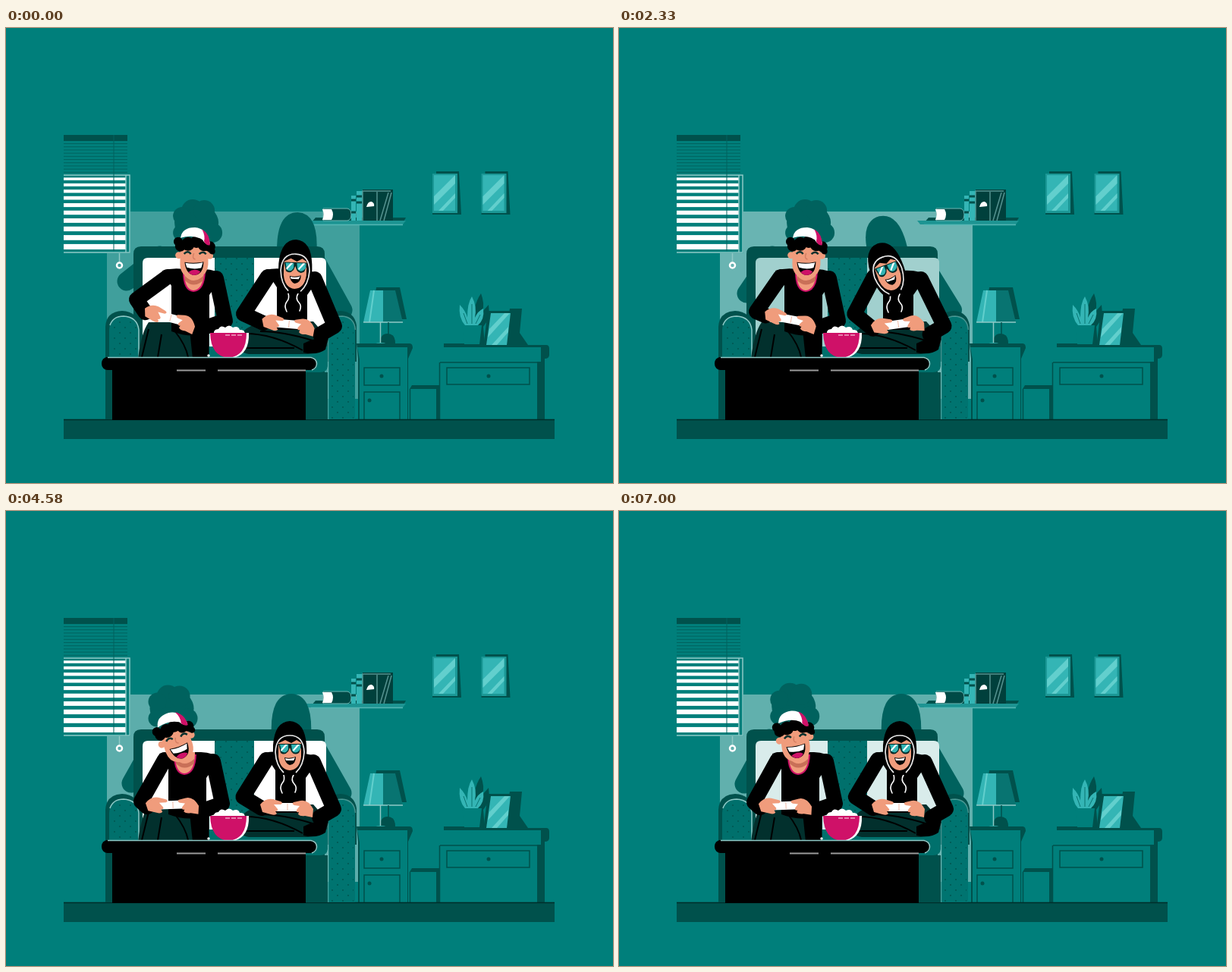
Animation of 800 by 600 pixels, one loop 7040 ms. Source, as an HTML page:

```html
<!DOCTYPE html>
<html lang="en">
<head>
<meta charset="utf-8">
<title>Game night</title>
<style>
html, body { margin: 0; width: 100%; height: 100%; overflow: hidden; background: #007f7b; }
svg { display: block; width: 800px; height: 600px; }
.wall { fill: #007f7b; }
.dark { fill: #00514c; }
.shade { fill: #00625e; }
.glass { fill: #34b5b5; }
.glint { fill: #62cfcd; }
.white { fill: #fff; }
.skin { fill: #f09c7c; }
.pink { fill: #cf1168; }
.pants { fill: #02302d; }
.dots { fill: url(#dots); }
.line { fill: none; stroke: #00514c; stroke-width: 1.5; }
.pale { fill: none; stroke: #8fc9c6; stroke-width: 1.5; }
.cord { fill: none; stroke: #fff; stroke-width: 1.6; stroke-linecap: round; }
.arm, .cast { fill: none; stroke: #000; stroke-width: 20; stroke-linecap: round; stroke-linejoin: round; }
.cast { stroke: #00625e; stroke-width: 25; }
.crease { fill: none; stroke: #000; stroke-width: 2; }
</style>
</head>
<body>
<svg viewBox="0 0 800 600">
<defs>
  <pattern id="dots" width="14" height="14" patternUnits="userSpaceOnUse">
    <circle cx="3" cy="3" r=".9" fill="#00514c"/><circle cx="10" cy="10" r=".9" fill="#00514c"/>
  </pattern>
  <g id="picture">
    <path class="dark" d="M567 189H597L600 246H562V242H567Z"/>
    <path fill="#1b9896" d="M562 192H595V244H562Z"/>
    <path class="glass" d="M564 194H592V241H564Z"/>
    <path class="glint" d="M564 222L592 194V205L564 233ZM570 241L592 218V224L576 241Z"/>
  </g>
  <g id="pad">
    <rect class="white" x="-22" y="-5" width="44" height="11" rx="4"/>
    <path class="skin" d="M-36 -3Q-29 -12 -19 -10L-9 -7Q-5 -5 -9 -3L-18 -3L-13 3Q-12 6 -16 6L-14 9Q-16 12 -22 10L-33 7Z"/>
    <path class="skin" d="M34 3Q27 -10 17 -8L8 -6Q5 -4 9 -2L16 -1L12 4Q11 8 15 7L14 10Q17 13 23 12L33 14Z"/>
    <path d="M0 -4V5" stroke="#f1b9a5"/>
  </g>
</defs>

<!-- light and window -->
<path id="glow" class="white" d="M133 242H466V489H133Z"/>
<path class="dark" d="M76 141H160V149H76Z"/>
<path class="wall" d="M76 193H164V297H76Z"/>
<g id="blinds"></g>
<path class="pale" d="M76 194H163V296H76M158 194V296"/>
<path d="M142 141V294" stroke="#00625e"/>
<path class="pale" d="M149.500 297V309"/>
<circle cx="149.500" cy="313" r="3.500" fill="none" stroke="#fff" stroke-width="2.500"/>

<!-- shelf -->
<path class="dark" d="M408 250H527L523 257H402Z"/>
<path d="M393 254H527L523 259H397Z" fill="#1d9492"/>
<path d="M402 259.500H523" stroke="#56b7b4" stroke-width="1.500"/>
<path d="M418 238H450Q455 239 455 246Q455 253 450 254H418Z" fill="#004a46" stroke="#6fb6b3"/>
<path class="white" d="M417 239H429Q433 246 429 253H417Q420 246 417 239Z"/>
<path class="glass" d="M455 221H461V254H455ZM462 215H469V254H462Z"/>
<path d="M455 227H461M455 243H461M462 222H469M462 230H469" stroke="#00514c" stroke-width="3"/>
<path d="M470 213H510V254H470Z" fill="#00403c"/>
<path class="pale" d="M470 254V215H507M489 216V254M504 217L493 254M508 217L498 254" opacity=".6"/>
<path class="white" d="M475 236Q477 228 482 229Q486 231 485 235Z"/>

<!-- cast shadows -->
<g id="puff" class="shade">
  <ellipse cx="250" cy="257" rx="29" ry="25"/>
  <circle cx="245" cy="241" r="15"/><circle cx="260" cy="241" r="14"/>
  <circle cx="231" cy="248" r="12"/><circle cx="271" cy="270" r="13"/>
  <circle cx="230" cy="270" r="11"/><ellipse cx="251" cy="284" rx="20" ry="16"/>
</g>
<path id="dome" class="shade" d="M-26 56Q-29 1 0 0Q29 1 26 56Z"/>
<path id="cast1" class="cast"/>
<path id="cast2" class="cast"/>

<use href="#picture"/><use href="#picture" x="64.500"/>

<!-- lamp -->
<path class="dark" d="M488 342H519L528 384H482ZM493 416Q493 403 503 403Q513 403 513 416Z"/>
<path fill="#087471" d="M480 346H513L523 388H471Z"/>
<path class="glass" d="M480 346H497V388H471Z"/>
<path d="M485 346L479 388" stroke="#62cfcd" stroke-width="2"/>
<path class="pale" d="M471 388H523M493.500 388V416"/>
<path class="line" d="M504 388V404"/>
<path d="M482 420Q485 415 494 415Q503 415 505 420Z" fill="#2aa5a2"/>

<!-- small cabinet -->
<path class="dark" d="M462 416H532Q536 416 536 422L530 436V516H464V436Z"/>
<path class="wall" d="M463 421H529V516H466V437Z"/>
<path class="line" d="M472 448H519V471H472ZM472 517V480H519V517"/>
<circle class="dark" cx="495" cy="459" r="2.500"/><circle class="dark" cx="479" cy="491" r="2.500"/>
<path class="dark" d="M535 471H571V516H567V476H532Z"/>
<path class="line" d="M532.500 476V516"/>

<!-- large cabinet -->
<path class="dark" d="M577 418H712Q716 418 716 423V431Q716 436 710 436V516H700V436H577Z"/>
<path class="wall" d="M572 421H705V440H700V516H572Z"/>
<path class="line" d="M572 441H704M571.500 441V516M581 448H690V470H581Z"/>
<circle class="dark" cx="636" cy="459" r="2.500"/>
<path class="dark" d="M618 390Q614 368 626 350Q631 363 628 374L636 365Q639 382 629 394L631 418H577V416H619Z"/>
<path class="glass" d="M605 392Q596 382 598 365Q606 373 608 382Q608 363 614 354Q621 367 618 382Q622 373 629 370Q631 384 622 392Z"/>
<path d="M608 390L603 376M614 390V364M619 390L625 378" stroke="#087471" fill="none"/>
<path class="wall" d="M601 392H627L624 417H604Z"/>
<path class="dark" d="M664 370H680L677 402L688 418H657ZM635 373H668L663 421H629Z"/>
<path class="glass" d="M639 376H665L660 418H633Z"/>
<path class="glint" d="M637 397L657 376H664L635 408ZM640 418L662 394V401L647 418Z"/>

<!-- floor and sofa -->
<path class="dark" d="M76 516H723V542H76Z"/>
<path d="M76 516.500H723" stroke="#002e2b" stroke-width="1.500"/>
<path class="dark" d="M168 440V298Q168 288 178 288H410Q420 288 420 298V516H395V440Z"/>
<path class="white" d="M180 425V310Q180 303 187 303H275V425ZM327 425V303H415Q422 303 422 310V425Z"/>
<path id="dim" fill="#007f7b" d="M180 425V310Q180 303 187 303H275V425ZM327 425V303H415Q422 303 422 310V425Z"/>
<path fill="#00706c" d="M275 303H327V425H275Z"/><path class="dots" d="M275 303H327V425H275Z"/>
<path class="dark" d="M131 440V394Q132 374 153 373Q174 374 176 394V440Z"/>
<path fill="#00706c" d="M136 440V398Q137 381 155 380Q174 381 175 398V440Z"/>
<path class="dots" d="M138 440V398Q139 383 155 382Q173 383 174 398V440Z"/>
<path class="pale" d="M137 392Q141 380 155 380Q173 381 175 398V434"/>
<path class="dark" d="M422 440V394Q422 374 441 373Q459 374 462 392V440Z"/>
<path fill="#007470" d="M425 516V398Q427 380 443 380Q459 381 460 398V516Z"/>
<path class="dots" d="M428 516V398Q430 383 443 382Q457 383 458 398V516Z"/>
<path class="pale" d="M424.500 516V398Q426 380 443 380Q459 381 460.500 398" opacity=".5"/>
<path fill="#00706c" d="M176 420H424V446Q423 454 414 454H176Z"/>
<path class="dark" d="M395 454H424V516H395Z"/>

<!-- player in the cap -->
<path class="pants" d="M188 388H268V436H174Q178 402 188 388Z"/>
<path d="M242 398H267V436H246Z"/>
<path class="crease" d="M188 397L179 434M205 404L200 434M222 399Q237 418 240 434"/>
<path id="torso1" d="M206 320Q220 316 234 318H261Q278 318 285 328L268 352V402Q244 410 218 400V340Z"/>
<path id="armL1" class="arm"/><path id="armR1" class="arm"/>
<use id="pad1" href="#pad"/>
<g id="neck1">
  <path class="skin" d="M235 318H261V333Q257 347 247 347Q238 346 235 333Z"/>
  <path d="M234 321Q234 346 247 347Q261 346 262 321" fill="none" stroke="#cf1168" stroke-width="2"/>
  <path d="M236 327Q247 339 260 327V333Q247 344 236 333Z" fill="#c97058"/>
</g>
<g id="head1">
  <circle class="skin" cx="227" cy="300" r="4.500"/><circle class="skin" cx="268" cy="300" r="4.500"/>
  <path class="skin" d="M229 283H266V312Q265 329 247 330Q230 329 229 312Z"/>
  <circle cx="226" cy="282" r="6"/><circle cx="229" cy="288" r="7"/><circle cx="239" cy="285" r="9"/>
  <circle cx="250" cy="282" r="8"/><circle cx="260" cy="286" r="8"/><circle cx="268" cy="288" r="7"/>
  <circle cx="271" cy="294" r="4"/>
  <path class="white" d="M229 277Q231 263 248 263Q264 264 268 284Q262 286 258 279Q246 272 229 277Z"/>
  <path class="pink" d="M257 265Q268 271 268 286Q263 287 260 281Q262 274 257 265Z"/>
  <path d="M234 298Q239 293 243 298M254 298Q259 293 263 298" fill="none" stroke="#00302d" stroke-width="2.500"/>
  <path d="M247 297Q244 304 249 305" fill="none" stroke="#d57f64" stroke-width="1.500"/>
  <path d="M235 309Q248 311 260 308Q260 325 248 326Q237 325 235 309Z"/>
  <path class="white" d="M236 310Q248 312 259 309L257 316Q248 319 238 316Z"/>
  <path class="pink" d="M240 322Q248 316 256 321Q253 326 247 326Q243 325 240 322Z"/>
</g>

<!-- player in the hood -->
<path class="pants" d="M307 408Q316 389 350 387H405L425 410Q422 427 398 430H320Q304 428 307 408Z"/>
<path class="crease" d="M312 403Q350 402 391 425M335 400Q365 400 404 412M314 422H380"/>
<path d="M392 416Q410 407 425 407L421 424Q410 432 392 428Z"/>
<path id="torso2" d="M342 319Q358 315 380 320Q407 318 414 328L397 352V398H357V342Z"/>
<path id="armL2" class="arm"/><path id="armR2" class="arm"/>
<use id="pad2" href="#pad"/>
<path id="strings" class="cord" d="M372 350Q374 357 370 361Q366 366 370 374M385 350Q381 357 386 362Q390 366 387 373"/>
<g id="head2">
  <path d="M382 279Q402 280 404 311Q406 340 392 350H370Q359 340 360 311Q362 280 382 279Z"/>
  <path class="skin" d="M367 303H397V326Q395 343 382 344Q369 343 367 326Z"/>
  <path d="M365 309Q366 298 382 297Q398 298 399 309L391 304L384 308L376 304Z"/>
  <path d="M382 298Q400 298 401 320Q400 338 390 347M382 298Q364 298 363 320Q364 338 374 347" fill="none" stroke="#e8e8e8" stroke-width="1.700"/>
  <path d="M367 309H397V314L394 321Q388 325 384 319L382 314L380 319Q375 325 370 321Z" fill="#002b29"/>
  <path class="glass" d="M369 310H380V316Q377 323 371 319ZM384 310H396V316Q390 324 385 318Z"/>
  <path class="white" d="M370 317L376 310H379L371 319ZM386 317L392 310H395L387 319Z"/>
  <path d="M375 327Q382 329 390 326Q390 336 382 337Q376 335 375 327Z"/>
  <path class="white" d="M376 328Q382 330 389 327L387 331H377Z"/>
</g>

<!-- table and bowl -->
<path class="white" d="M274 404Q273 397 280 397Q283 391 289 395Q294 390 299 395Q306 392 308 398Q315 397 315 404Z"/>
<path class="white" d="M274 402H320Q321 430 300 435Z"/>
<path class="pink" d="M269 402H317Q317 433 293 435Q270 433 269 402Z"/>
<path d="M289 405H313" stroke="#f1a3c4" stroke-width="1.500" stroke-dasharray="6 2"/>
<circle class="white" cx="267" cy="432" r="1.700"/>
<path class="dark" d="M131 450H141V516H131Z"/>
<rect x="126" y="434" width="284" height="17" rx="8"/>
<path d="M140 450H395V517H140Z"/>
<path class="pale" d="M134 434.500H402Q409.500 436 409.500 443Q409 449 403 451"/>
<path d="M225 451.500H263M279 451.500H395" stroke="#9a9a9a" stroke-width="2"/>
</svg>

<script>
const LOOP = 7040;
const $ = id => document.getElementById(id);
const set = (id, name, value) => $(id).setAttribute(name, value);

// Slats open wider towards the bottom.
let slats = '';
for (let i = 0; i < 10; i++) {
  const h = 3.5 + i * 0.4;
  const y = 199 + 7.6 * i + 0.26 * i * i;
  slats += `<rect class="white" x="76" y="${y - h / 2}" width="82" height="${h}"/>`;
  slats += `<rect class="shade" x="76" y="${152 + i * 4.2}" width="84" height="1"/>`;
}
$('blinds').innerHTML = slats;

// The players hold a pose, then shift to the next one within [start, end] ms.
const moves = [[0, 550], [1300, 1850], [3750, 4080], [4080, 4550], [5250, 5750]];
const tracks = {
  neck1: [247, 247, 246, 242, 235, 236],
  tilt1: [1, 3, 1, 0, -18, -8],
  body1: [0, 0, 0, -2, -4, -4],
  padX1: [217, 227, 227, 224, 220, 220],
  padY1: [382, 384, 384, 385, 387, 388],
  turn1: [15, 11, 11, 7, -2, -2],
  elbowX1: [172, 181, 181, 180, 178, 178],
  elbowY1: [358, 374, 374, 376, 383, 384],
  neck2: [380, 377, 365, 374, 374, 370],
  neckY2: [350, 350, 351, 348, 348, 348],
  tilt2: [2, 10, -20, 0, 0, 0],
  body2: [0, 0, -9, -1, -2, -4],
  pad2: [373, 373, 368, 371, 371, 369],
  turn2: [5, 6, -8, 3, 0, 0],
  glow: [0.25, 0.34, 0.41, 0.38, 0.36, 0.38]
};

const clamp = u => Math.min(1, Math.max(0, u));
const smooth = u => u * u * (3 - 2 * u);

function poseAt(t) {
  const pose = {};
  const done = moves.map(([a, b]) => smooth(clamp((t - a) / (b - a))));
  for (const name in tracks) {
    const v = tracks[name];
    pose[name] = done.reduce((sum, k, i) => sum + (v[i + 1] - v[i]) * k, v[0]);
  }
  return pose;
}

// The screen's light drops briefly and returns.
const flicker = (t, peak, depth) => depth * smooth(clamp(1 - Math.abs(t - peak) / 250));

const move = (id, x, y = 0, turn = 0) => set(id, 'transform', `translate(${x} ${y}) rotate(${turn})`);
const limb = (id, ...points) => set(id, 'd', 'M' + points.map(p => p.join(' ')).join('L'));
const rad = deg => deg * Math.PI / 180;
const lean = (x, tilt, length) => x + length * Math.sin(rad(tilt));

// A point beside the controller, turned with it.
function grip(x, y, turn, dx, dy) {
  const c = Math.cos(rad(turn)), s = Math.sin(rad(turn));
  return [x + dx * c - dy * s, y + dx * s + dy * c];
}

function draw(t) {
  const p = poseAt(t);

  move('torso1', p.body1);
  move('neck1', p.neck1 - 247);
  set('head1', 'transform', `translate(${p.neck1 - 247} 0) rotate(${p.tilt1} 247 335)`);
  move('pad1', p.padX1, p.padY1, p.turn1);
  limb('armL1', [213 + p.body1, 328], [p.elbowX1, p.elbowY1], grip(p.padX1, p.padY1, p.turn1, -34, 2));
  limb('armR1', [277 + p.body1, 330], [289 + p.body1, 386], [269 + p.body1, 393]);
  move('puff', lean(p.neck1, p.tilt1, 63) - 247, 72 * (1 - Math.cos(rad(p.tilt1))));
  limb('cast1', [202 + p.body1, 300], [p.elbowX1 - 13, p.elbowY1 - 24]);

  move('torso2', p.body2);
  move('strings', p.neck2 - 380, p.neckY2 - 350);
  set('head2', 'transform', `translate(${p.neck2 - 382} ${p.neckY2 - 350}) rotate(${p.tilt2} 382 350)`);
  move('pad2', p.pad2, 390, p.turn2);
  limb('armL2', [345 + p.body2, 328], [313 + p.body2 * 0.3, 377], grip(p.pad2, 390, p.turn2, -34, 2));
  limb('armR2', [407 + p.body2, 331], [433 + p.body2 * 0.5, 393], [414 + p.body2 * 0.5, 404]);
  move('dome', lean(p.neck2, p.tilt2, 71) + 2, p.neckY2 - 107 + 71 * (1 - Math.cos(rad(p.tilt2))), p.tilt2 * 0.7);
  limb('cast2', [407 + p.body2, 305], [444 + p.body2 * 0.5, 372]);

  set('glow', 'opacity', p.glow);
  set('dim', 'opacity', flicker(t, 2330, 0.37) + flicker(t, 7000, 0.15));
}

const start = performance.now();
function tick(now) {
  draw(Math.max(0, now - start) % LOOP);
  requestAnimationFrame(tick);
}
draw(0);
requestAnimationFrame(tick);
</script>
</body>
</html>
```
